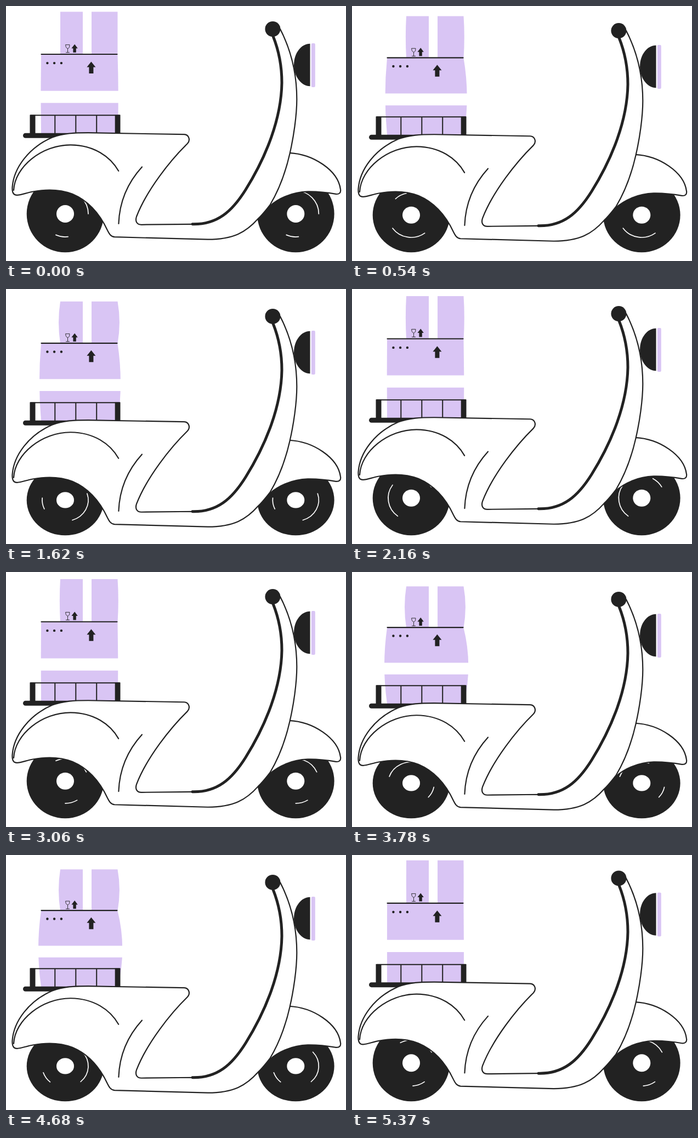
Animation, 620 px wide and 465 px high, one loop 5.4 s. Source, as an HTML page:

```html
<!DOCTYPE html>
<html lang="en">
<head>
<meta charset="utf-8">
<title>Delivery scooter</title>
<style>
  html, body { margin: 0; width: 100%; height: 100%; overflow: hidden; background: #fff; }
  svg { display: block; width: 620px; height: 465px; }
  .ink { fill: #222; }
  .lilac { fill: #d9c5f4; }
  .line { fill: none; stroke: #222; stroke-width: 2.2; stroke-linecap: round; stroke-linejoin: round; }
  .shell { fill: #fff; }
  .shine { fill: none; stroke: #fff; stroke-width: 1.7; stroke-linecap: round; }
</style>
</head>
<body>
<svg viewBox="0 0 620 465">
  <defs>
    <g id="wheel">
      <circle class="ink" r="70.3"/>
      <circle r="16" fill="#fff"/>
      <g id="shine">
        <path class="shine" d="M0 -42A42 42 0 0 1 42 0"/>
        <path class="shine" d="M5.1 41.7A42 42 0 0 1 -17.1 38.4"/>
      </g>
    </g>
  </defs>

  <g class="tyre" data-x="108"><use href="#wheel"/></g>
  <g class="tyre" data-x="528.3"><use href="#wheel"/></g>

  <g id="frame">
    <g id="stack">
      <path id="lower" class="lilac"/>
      <path fill="#fff" d="M45 154.3H225V176.6H45Z"/>
      <path id="upperLeft" class="lilac"/>
      <path id="upperRight" class="lilac"/>
      <path class="line" d="M64.5 87.3H202.5"/>
    </g>
    <g class="mark" data-y="78">
      <path class="line" style="stroke-width:.9" d="M109 69.9H116L115.5 74.4Q112.5 79.4 109.5 74.4ZM112.5 77.4V83.9M109.5 83.9H115.5"/>
      <path class="ink" d="M125.2 68.9L130.8 76.4H127.8V83.9H122.4V76.4H119.4Z"/>
    </g>
    <g class="mark" data-y="108">
      <path class="ink" d="M155.4 100.8L163.4 110.8H159.4V122.3H151.4V110.8H147.4Z"/>
      <g class="ink">
        <circle cx="75.4" cy="103.5" r="2.2"/><circle cx="88.1" cy="103.5" r="2.2"/><circle cx="100.9" cy="103.5" r="2.2"/>
      </g>
    </g>

    <rect class="ink" x="31" y="231.8" width="120" height="9" rx="4.5"/>
    <path class="ink" d="M43.5 198.5H53.5V233H43.5ZM198.7 198.5H208.5V233H198.7Z"/>
    <path class="line" style="stroke-width:2" d="M45 199.3H207M89.3 200V232M127.3 200V232M165.2 200V232"/>

    <path class="line shell" d="M516 267.8C560 269.8 605.5 299.5 610 334.5C611 340.5 607.5 343.5 601.5 342.9C580 339 562 338.2 550 338.4C522 339.3 497 350.5 479.5 366Z"/>
    <path class="ink" d="M554.5 68.8C538.5 68.8 525 85.8 525 107.3S538.5 146.3 554.5 146.3Z"/>
    <rect class="lilac" x="556.8" y="68" width="7" height="80" rx="2"/>

    <path class="line shell" d="M20.5 344.9C14 345.4 11 340.6 11.5 330.6C14 295 42 258 84 239.8C105 231.8 125 231.2 150 231.2L325 234.2C333 234.7 337 243.8 331 250.8C300 281 257 335 238 384C235 393 239 398.8 247 398.8L340 397.8C385 398.8 412 375 437 335C475 274 502 205 503 140C503 105 497 80 487 55L500 42C519.5 80 530.3 125 530.3 170C530.3 200 524.3 240 517.3 270C509.3 305 496.3 338 481.3 363C477 368 470 378 460 387.6C438 412.5 415 425.7 368 425.7L198 421.2C191 420.7 188 415 185 409C170 377 150 355 121 342.8C95 332.8 70 334.6 49 338.5C38 340.5 28 344.4 20.5 344.9Z"/>
    <path class="line" style="stroke-width:5" d="M340 397.8C385 398.8 412 375 437 335C475 274 502 205 503 140C503 105 497 80 487 55"/>
    <path class="line" d="M14 336C16 293 66 253 118 253.3C160 253.8 190 274 205.2 300.8M205.4 397C207 355 222 322 248 293.5"/>
    <circle class="ink" cx="486.4" cy="42" r="14"/>
  </g>
</svg>
<script>
  const $ = id => document.getElementById(id);
  const LOOP = 5400, STEP = 30, BOUNCE = 15, BASE = 232;
  const wave = n => (1 - Math.cos(2 * Math.PI * n / BOUNCE)) / 2;
  const setPath = (id, d) => $(id).setAttribute('d', d);
  const move = (el, t) => el.setAttribute('transform', t);

  function draw(ms) {
    const n = Math.floor(ms % LOOP / STEP);
    const dip = wave(n), squash = wave(n + 1.7);
    const k = 1 - 0.0405 * squash;

    move($('frame'), `translate(0 ${8.8 * dip})`);
    move($('stack'), `translate(0 ${BASE * (1 - k)}) scale(1 ${k})`);
    document.querySelectorAll('.mark').forEach(m =>
      move(m, `translate(0 ${(BASE - m.dataset.y) * (1 - k)})`));

    // Side walls bulge as the load settles; the upper boxes follow a little later.
    setPath('lower', `M64 88H203.5Q${203.7 + 17 * squash} 160 204 232H64Q${64 - 10 * squash} 160 64 88Z`);
    setPath('upperLeft', `M99 9.3H140V88H99Q${99 - 6.5 * dip} 48 99 9.3Z`);
    setPath('upperRight', `M156 9.3H203.5Q${203.5 + 7.5 * dip} 48 203.5 88H156Z`);

    // Tyres flatten against the ground while the wheels turn 14 times per loop.
    const flat = 1 - 0.094 * dip;
    document.querySelectorAll('.tyre').forEach(t =>
      move(t, `translate(${t.dataset.x} ${449 - 70 * flat}) scale(1 ${flat})`));
    move($('shine'), `rotate(${28 * n})`);
  }

  const start = performance.now();
  (function tick() {
    draw(performance.now() - start);
    requestAnimationFrame(tick);
  })();
</script>
</body>
</html>
```
